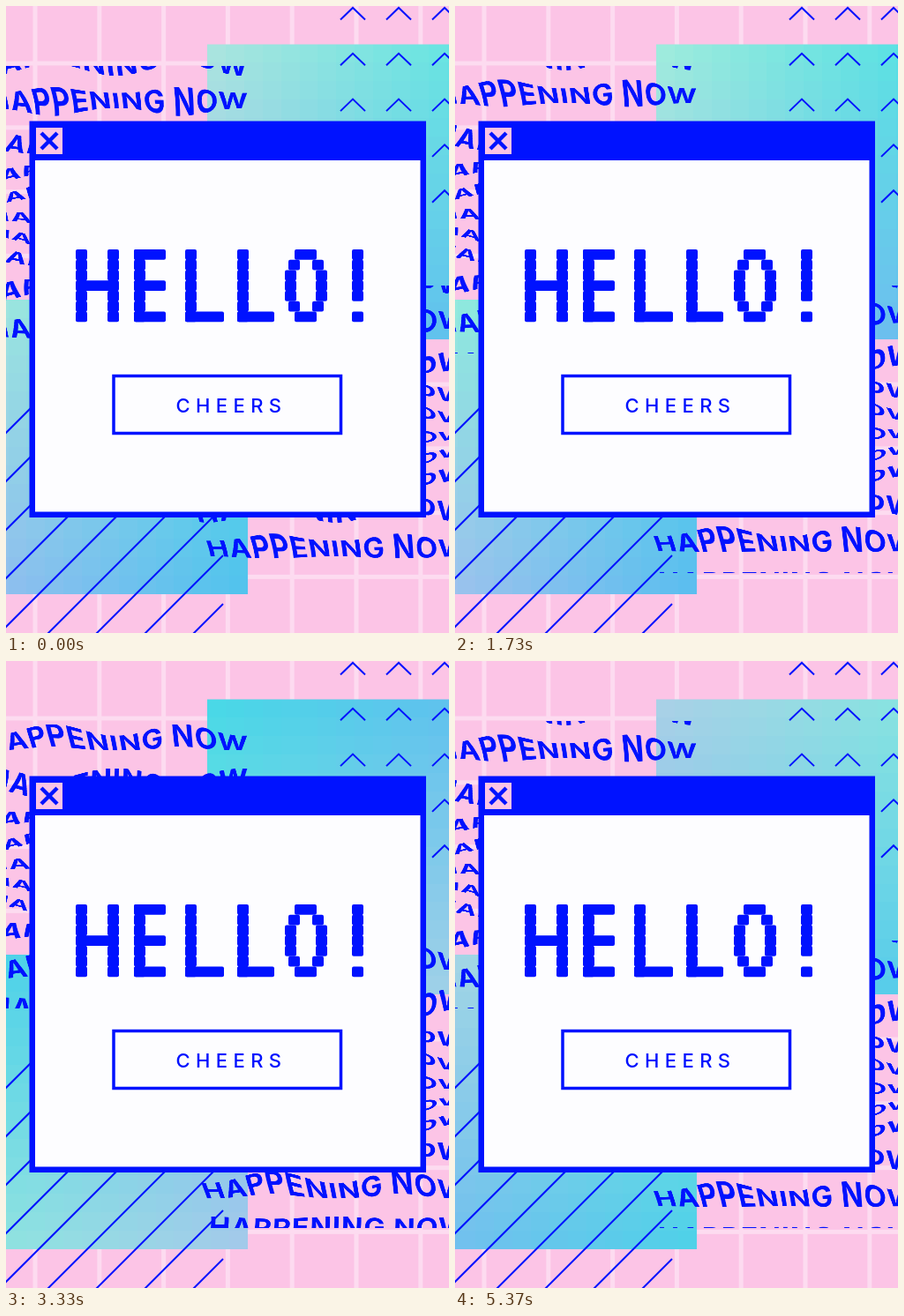
An HTML page with a canvas that plays this animation: 502 px wide and 711 px high, repeating every 5410 ms.

```html
<!DOCTYPE html>
<html lang="en">
<head>
<meta charset="utf-8">
<title>Hello</title>
<style>
  html, body { margin: 0; width: 100%; height: 100%; overflow: hidden; background: #fcc4e6; }
  canvas { display: block; }
</style>
</head>
<body>
<canvas id="stage" width="502" height="711" role="img" aria-label="Hello! Cheers"></canvas>
<script>
const LOOP = 5410, TAU = Math.PI * 2;
const BLUE = '#0012ff', PINK = '#fcc4e6', GRID = '#fddbf0', WHITE = '#fdfdff';
const ctx = document.getElementById('stage').getContext('2d');

function makeCanvas(w, h) {
  const c = document.createElement('canvas');
  c.width = w;
  c.height = h;
  return c.getContext('2d', { willReadFrequently: true });
}

function box(c, color, x, y, w, h) {
  c.fillStyle = color;
  c.fillRect(x, y, w, h);
}

function line(c, ...points) {
  c.beginPath();
  points.forEach(([x, y]) => c.lineTo(x, y));
  c.stroke();
}

// ---- Four-corner gradient whose colours travel around the corners ----
const PALETTE = [[169, 236, 220], [72, 226, 228], [79, 188, 240], [168, 188, 240]];
const corners = makeCanvas(2, 2);

function turnGradient(turn) {
  [0, 1, 3, 2].forEach((corner, i) => {
    const p = (((corner - turn) % 4) + 4) % 4, k = Math.floor(p), f = p - k;
    const a = PALETTE[k], b = PALETTE[(k + 1) % 4];
    const rgb = a.map((v, j) => Math.round(v + (b[j] - v) * f));
    box(corners, `rgb(${rgb})`, i % 2, i >> 1, 1, 1);
  });
}

function gradientSquare(x, y, size) {
  ctx.save();
  ctx.beginPath();
  ctx.rect(x, y, size, size);
  ctx.clip();
  ctx.drawImage(corners.canvas, x - size / 2, y - size / 2, size * 2, size * 2);
  ctx.restore();
}

// ---- Repeated line of text scrolling through a fixed warp ----
const LEFT = -40, TOP = 68, W = 324, H = 326, TEXT_X = -26;
const TILE_W = 640, TILE_H = 102;
const ROWS = [18, 62, 107, 160, 189, 214, 240, 262, 285, 319, 366, 410, 454];
const sheet = makeCanvas(W, H);
const sheetData = sheet.createImageData(W, H);
const mapX = new Float32Array(W * H), mapRow = new Float32Array(W * H);

function makeTile() {
  const c = makeCanvas(TILE_W, TILE_H);
  c.font = '700 66px Inter, Arial, sans-serif';
  c.letterSpacing = '2px';
  c.fillText('HAPPENING NOW', 0, 75);
  const d = c.getImageData(0, 0, TILE_W, TILE_H).data;
  return Float32Array.from({ length: TILE_W * TILE_H }, (_, i) => d[i * 4 + 3]);
}
const tile = makeTile();

function rowAt(y) {
  let k = 0;
  while (k < ROWS.length - 2 && y > ROWS[k + 1]) k++;
  return k + (y - ROWS[k]) / (ROWS[k + 1] - ROWS[k]);
}

function smoothRow(y) {
  let sum = 0;
  for (let d = -10; d <= 10; d++) sum += rowAt(y + d);
  return sum / 21;
}

function buildWarp() {
  const rows = Array.from({ length: 480 }, (_, y) => smoothRow(y));
  for (let j = 0; j < H; j++) {
    for (let i = 0; i < W; i++) {
      const x = i + LEFT + 0.5, y = j + TOP + 0.5, n = j * W + i;
      const calm = Math.min(1, (H - j) / 45);
      const dy = 7 * calm * Math.cos(TAU * (x - 125) / 145) * Math.cos(TAU * (y - 73) / 131);
      const fade = Math.max(0, 1 - (x - TEXT_X) / 306);
      const dx = 8 * Math.sin(TAU * (y - 352) / 131) * fade;
      const yy = y - dy, k = Math.floor(yy);
      mapX[n] = (x - dx - TEXT_X) * 2;
      mapRow[n] = rows[k] + (rows[k + 1] - rows[k]) * (yy - k);
    }
  }
  const px = sheetData.data;
  for (let n = 0; n < W * H; n++) {
    px[n * 4 + 1] = 18;
    px[n * 4 + 2] = 255;
  }
}

function scrollText(phase) {
  const px = sheetData.data;
  for (let n = 0; n < W * H; n++) {
    const u = mapX[n], s = mapRow[n] - phase + 0.5;
    let alpha = 0;
    if (u >= 0 && u < TILE_W - 1) {
      const v = (s - Math.floor(s)) * TILE_H;
      const x = Math.floor(u), y = Math.min(Math.floor(v), TILE_H - 2);
      const fx = u - x, fy = Math.min(v - y, 1), p = y * TILE_W + x, q = p + TILE_W;
      const upper = tile[p] + (tile[p + 1] - tile[p]) * fx;
      const lower = tile[q] + (tile[q + 1] - tile[q]) * fx;
      alpha = upper + (lower - upper) * fy;
    }
    px[n * 4 + 3] = alpha;
  }
  sheet.putImageData(sheetData, 0, 0);
}

// ---- Still layers ----
function drawGrid(c) {
  box(c, PINK, 0, 0, 502, 711);
  for (let k = 0; k < 10; k++) {
    box(c, GRID, 30.5 + 72.8 * k, 0, 5, 711);
    box(c, GRID, 0, 62.5 + 72.8 * k, 502, 5);
  }
}

function drawLines(c) {
  c.strokeStyle = BLUE;
  c.lineWidth = 2;
  for (let sum = 484; sum <= 924; sum += 55) line(c, [246, sum - 246], [-10, sum + 10]);
  for (let x = 393; x < 510; x += 52) {
    for (let y = 2; y < 220; y += 51.8) line(c, [x - 14, y + 13.5], [x, y], [x + 14, y + 13.5]);
  }
}

function drawHello(c) {
  const top = 276, step = 11.75;
  const block = (x, row, w = 13) => {
    c.beginPath();
    c.roundRect(x, top + row * step, w, step, 2);
    c.fill();
  };
  const stem = (x, from = 0, to = 6) => {
    for (let r = from; r <= to; r++) block(x, r);
    c.fillRect(x + 1, top + from * step + 2, 11, (to - from + 1) * step - 4);
  };
  c.fillStyle = BLUE;
  stem(79);
  stem(115);
  block(84, 3, 40);
  stem(145);
  [0, 3, 6].forEach(r => block(145, r, 36));
  stem(203);
  block(203, 6, 44);
  stem(262);
  block(262, 6, 42);
  block(327, 0, 25);
  block(327, 6, 25);
  stem(316, 2, 4);
  stem(351, 2, 4);
  [1, 5].forEach(r => { block(320, r); block(347, r); });
  stem(392, 0, 4);
  block(392, 6);
}

function drawWindow(c) {
  box(c, BLUE, 26.5, 130.5, 449.5, 449.5);
  box(c, WHITE, 33, 175, 436.5, 398.5);
  box(c, PINK, 34, 138, 30, 30);
  c.strokeStyle = BLUE;
  c.lineWidth = 4.5;
  line(c, [40, 144], [58, 162]);
  line(c, [58, 144], [40, 162]);
  drawHello(c);
  c.lineWidth = 3.5;
  c.strokeRect(122, 419.5, 257.5, 65);
  c.font = '500 22px Inter, Arial, sans-serif';
  c.letterSpacing = '6.4px';
  c.fillText('CHEERS', 192.5, 461);
}

function layer(draw) {
  const c = makeCanvas(502, 711);
  draw(c);
  return c.canvas;
}

const grid = layer(drawGrid), lines = layer(drawLines), panel = layer(drawWindow);
buildWarp();

function render(t) {
  turnGradient(t / 147.5 + 0.15);
  scrollText((Math.max(t, 45) - 45) / 910);
  ctx.drawImage(grid, 0, 0);
  gradientSquare(228, 43.5, 334.5);
  gradientSquare(-60, 333, 334);
  ctx.drawImage(lines, 0, 0);
  ctx.drawImage(sheet.canvas, LEFT, TOP);
  ctx.drawImage(sheet.canvas, LEFT + 249, TOP + 249);
  ctx.drawImage(panel, 0, 0);
}

const start = performance.now();
function tick() {
  render((performance.now() - start) % LOOP);
  requestAnimationFrame(tick);
}
tick();
</script>
</body>
</html>
```
